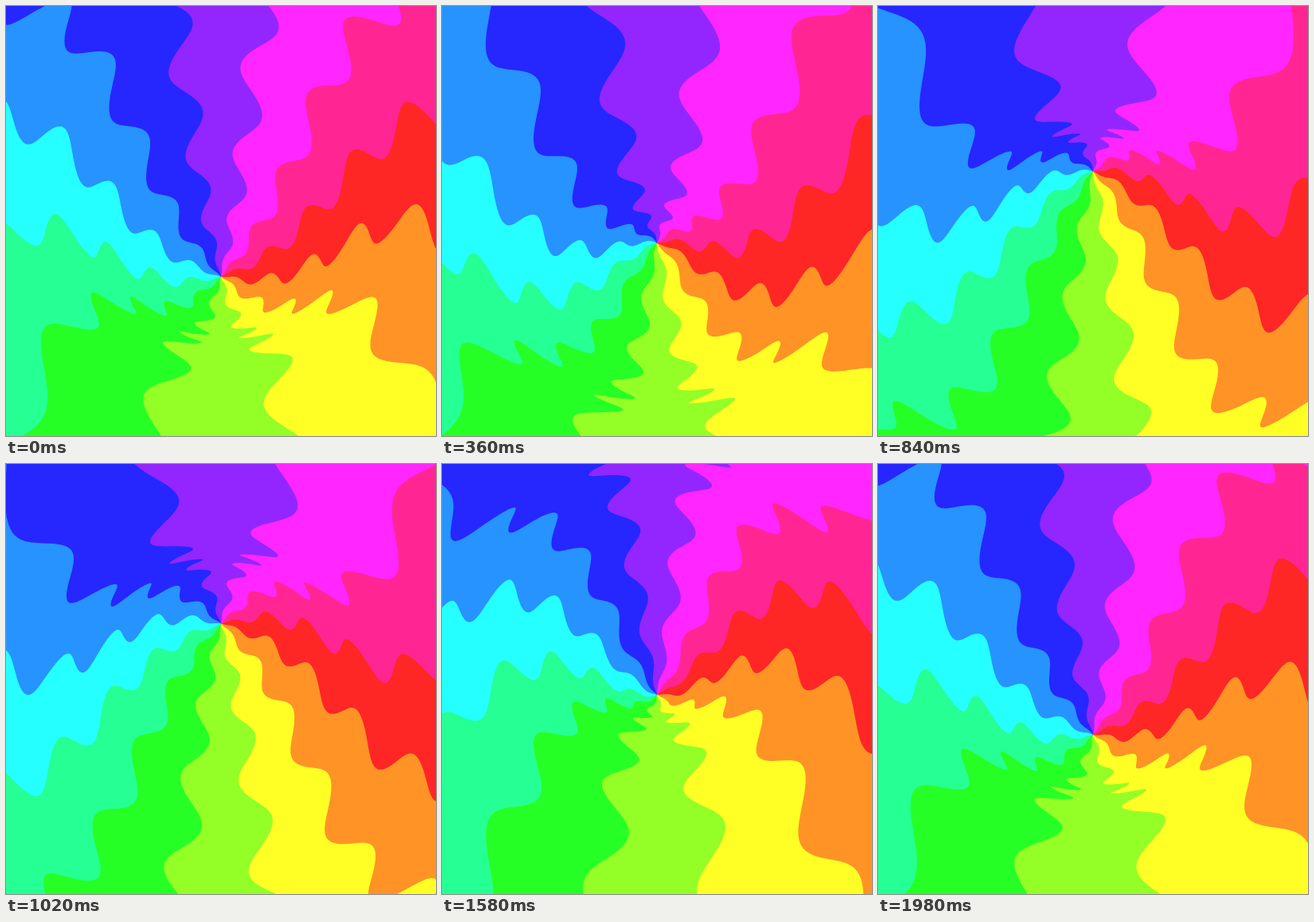
Recreate the animation shown at these times as an HTML page. Size 540x540 px, loop 2000 ms.

```html
<!DOCTYPE html>
<html lang="en">
<head>
<meta charset="utf-8">
<title>Rippling colour wheel</title>
<style>
  html, body { margin: 0; width: 100%; height: 100%; overflow: hidden; }
  svg { display: block; width: 100vw; height: 100vh; }
</style>
</head>
<body>
<svg id="stage" viewBox="0 0 540 540" preserveAspectRatio="xMidYMid slice"></svg>
<script>
const LOOP = 2000, STEP = 20;
const SECTORS = 12, REACH = 520, RING_GAP = 2;
const TAU = Math.PI * 2, DEG = Math.PI / 180;
const stage = document.getElementById('stage');
const hue = k => `hsl(${k * 360 / SECTORS}, 100%, 57.5%)`;

function add(tag, attributes) {
  const node = document.createElementNS('http://www.w3.org/2000/svg', tag);
  for (const name in attributes) node.setAttribute(name, attributes[name]);
  return stage.appendChild(node);
}

// Red is the ground; the other sectors lie on it, each tucked under the next.
add('rect', { width: 540, height: 540, fill: hue(0) });
const wedges = [];
for (let k = 1; k < SECTORS; k++) wedges.push(add('path', { fill: hue(k) }));

// Each ring follows the bobbing hub with a delay and twists back and forth.
// The ripples widen gently towards the rim.
function ring(r, time) {
  const lag = 0.8 * (Math.hypot(r, 40) - 40);
  const swing = 60 + 10 * Math.exp(-r / 80);
  const twist = 8.6 * Math.exp(-r / 560);
  const wave = 0.0228 * r - 0.0000215 * r * r - 1.85 + 4 * time;
  return {
    r,
    y: 270 + swing * Math.cos(TAU * time - lag * DEG),
    turn: twist * Math.cos(TAU * wave) - 0.7
  };
}

function edge(rings, degrees) {
  return rings.map(({ r, y, turn }) => {
    const a = (degrees + turn) * DEG;
    return (270 + r * Math.cos(a)).toFixed(2) + ' ' + (y + r * Math.sin(a)).toFixed(2);
  });
}

function draw(ms) {
  const time = (Math.floor(ms % LOOP / STEP) + 0.5) * STEP / LOOP;
  const rings = [];
  for (let r = 0; r <= REACH; r += RING_GAP) rings.push(ring(r, time));
  wedges.forEach((wedge, i) => {
    const middle = (i + 1) * 30;
    const overlap = i < wedges.length - 1 ? 15 : 0;
    const points = edge(rings, middle - 15)
      .concat(edge(rings.slice(-1), middle))
      .concat(edge(rings, middle + 15 + overlap).reverse());
    wedge.setAttribute('d', 'M' + points.join('L') + 'Z');
  });
}

const start = performance.now();
function tick() {
  draw(performance.now() - start);
  requestAnimationFrame(tick);
}
tick();
</script>
</body>
</html>
```
